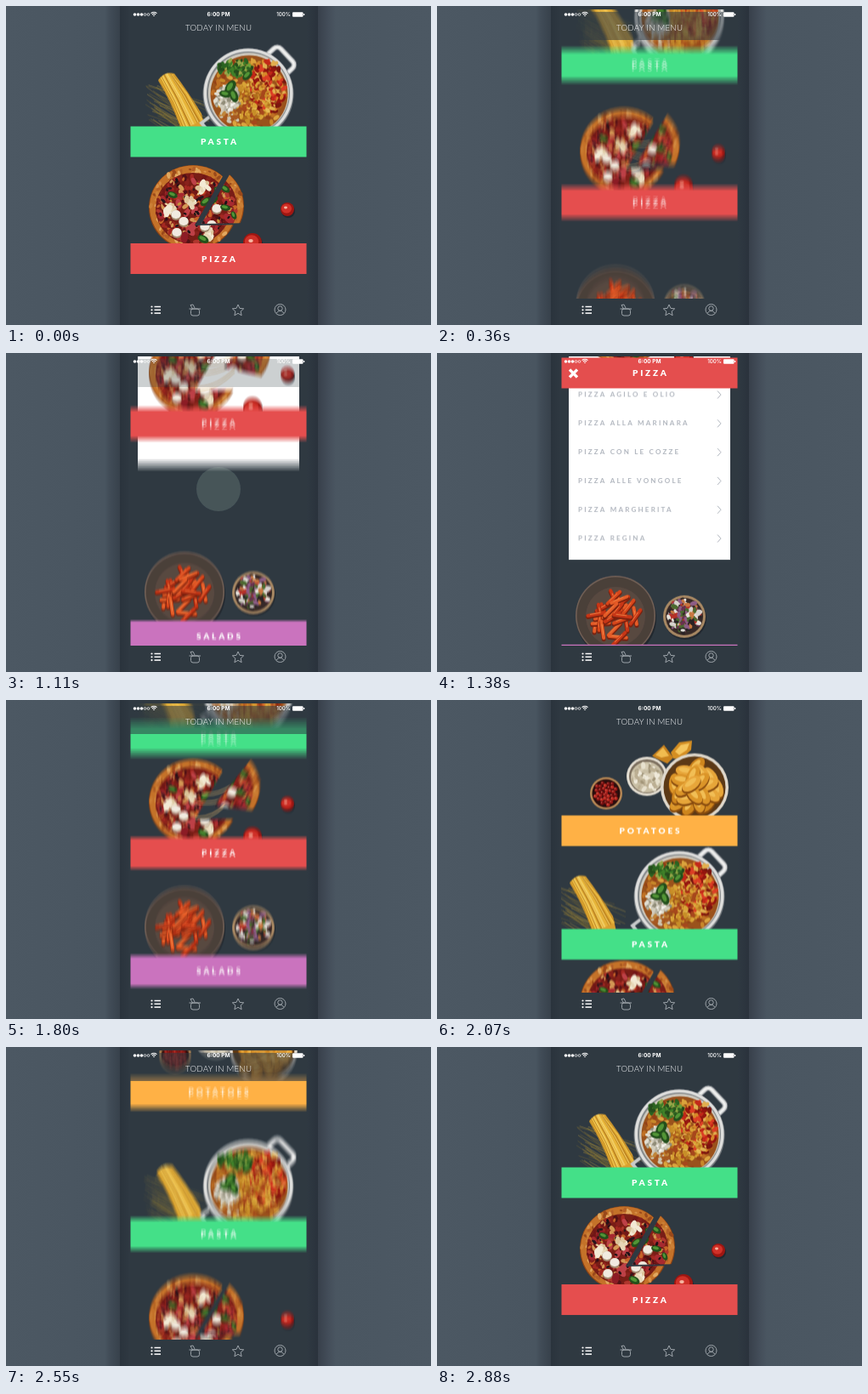
Animation, 500 px wide and 375 px high, one loop 2910 ms. Source, as an HTML page with a canvas:

```html
<!DOCTYPE html>
<html lang="en">
<head>
<meta charset="utf-8">
<title>Today in menu</title>
<style>
html, body { margin: 0; width: 100%; height: 100%; overflow: hidden; background: #4b5762; }
canvas { display: block; width: 500px; height: 375px; }
</style>
</head>
<body>
<canvas id="stage" width="500" height="375"></canvas>
<script>
const LOOP = 2910, STEP = 30, SHUTTER = 11, SAMPLES = 8;
const W = 500, H = 375, LEFT = 146, RISE = 130, BAR = 36;
const DARK = '#323c45', FONT = 'Lato, sans-serif';
const ctx = document.getElementById('stage').getContext('2d');

function layer(w, h) {
  const c = document.createElement('canvas');
  c.width = w; c.height = h;
  return c.getContext('2d');
}

// ---- easing ----
const clamp = v => Math.max(0, Math.min(1, v));
const ramp = (t, a, b) => clamp((t - a) / (b - a));

// cubic-bezier(.5, 0, .2, 1)
function ease(u) {
  if (u <= 0) return 0;
  if (u >= 1) return 1;
  let lo = 0, hi = 1, s = 0.5;
  for (let i = 0; i < 18; i++) {
    s = (lo + hi) / 2;
    const r = 1 - s;
    if (1.5 * r * r * s + 0.6 * r * s * s + s * s * s < u) lo = s; else hi = s;
  }
  return s * s * (3 - 2 * s);
}
const glide = (t, start, dur) => ease((t - start) / dur);

// ---- drawing helpers ----
let seed = 1;
function rnd() {
  seed = (seed * 1664525 + 1013904223) >>> 0;
  return seed / 4294967296;
}
const pick = list => list[Math.floor(rnd() * list.length)];

function blob(g, x, y, rx, ry, fill, rot = 0) {
  g.fillStyle = fill;
  g.beginPath();
  g.ellipse(x, y, rx, ry, rot, 0, 7);
  g.fill();
}
function line(g, pts, color, width) {
  g.strokeStyle = color;
  g.lineWidth = width;
  g.beginPath();
  pts.forEach(([x, y], i) => i ? g.lineTo(x, y) : g.moveTo(x, y));
  g.stroke();
}
function poly(g, pts, fill) {
  g.fillStyle = fill;
  g.beginPath();
  pts.forEach(([x, y]) => g.lineTo(x, y));
  g.closePath();
  g.fill();
}
function scatter(g, n, x, y, rx, ry, size, colors) {
  for (let i = 0; i < n; i++) {
    const a = rnd() * 6.28, d = Math.sqrt(rnd()), s = size * (0.5 + rnd() * 0.6);
    blob(g, x + Math.cos(a) * d * rx, y + Math.sin(a) * d * ry, s, s * 0.6, pick(colors), rnd() * 3);
  }
}
function leaf(g, x, y, size, rot) {
  blob(g, x, y, size, size * 0.6, '#27521f', rot);
  blob(g, x - 0.6, y - 0.8, size * 0.6, size * 0.3, '#55963a', rot);
}
function tomato(g, x, y, r) {
  blob(g, x + 1, y + 2, r, r, '#232a32');
  blob(g, x, y, r, r, '#a01a15');
  blob(g, x - 1, y - 1, r * 0.75, r * 0.7, '#d0342a');
  blob(g, x - 2, y - 2, r * 0.25, r * 0.18, '#f7b8a4');
}
function text(g, str, x, y, font, color, spacing, align = 'center') {
  g.font = font + ' ' + FONT;
  g.fillStyle = color;
  g.letterSpacing = spacing + 'px';
  g.textAlign = align;
  g.textBaseline = 'middle';
  g.fillText(str, align === 'center' ? x + spacing / 2 : x, y);
}

// ---- food; x on stage, y relative to the bar top ----
function sprite(draw) {
  seed = 77;
  const g = layer(210, RISE + 32);
  g.translate(-LEFT, RISE);
  draw(g);
  return g.canvas;
}
const put = (g, img, x, y) => g.drawImage(img, LEFT + x, y - RISE);

const potatoes = sprite(g => {
  blob(g, 199, -26, 19, 19, '#b98a58');
  blob(g, 199, -26, 16.5, 16.5, '#2e1110');
  for (let i = 0; i < 34; i++) {
    const d = 14 * Math.sqrt(i / 34), x = 199 + Math.cos(i * 2.4) * d, y = -26 + Math.sin(i * 2.4) * d;
    blob(g, x, y, 2.3, 2.2, pick(['#9a1c1a', '#bb2a22', '#7c1414']));
    blob(g, x - 0.6, y - 0.7, 0.7, 0.6, '#e08070');
  }
  blob(g, 247, -46, 24, 23, '#e4ded2');
  blob(g, 247, -46, 21, 20, '#7d7160');
  blob(g, 247, -45, 19, 18, '#c9bfa6');
  scatter(g, 60, 247, -45, 16, 15, 4, ['#e8e1cf', '#bcb094', '#a4987c', '#efe9da', '#d8ceb6']);
  poly(g, [[253, -70], [267, -83], [278, -68], [271, -61], [258, -67]], '#c98422');
  poly(g, [[257, -71], [266, -80], [273, -70], [264, -68]], '#f2bc52');
  poly(g, [[275, -74], [285, -86], [300, -88], [299, -77], [287, -66], [278, -67]], '#d48f26');
  poly(g, [[280, -75], [287, -83], [297, -85], [294, -77], [285, -71]], '#f6c660');
  blob(g, 303, -33, 40, 40, '#e0d9cc');
  blob(g, 303, -33, 36.5, 36.5, '#5e3c1a');
  for (let i = 0; i < 21; i++) {
    const a = i * 2.4, d = 26 * Math.sqrt(1 - i / 21), rot = rnd() * 3;
    const x = 303 + Math.cos(a) * d, y = -33 + Math.sin(a) * d;
    blob(g, x, y + 2, 13, 7.5, '#8a4e12', rot);
    blob(g, x, y, 12.5, 7, pick(['#dc962c', '#cf8622', '#e8a73e']), rot);
    blob(g, x - 1, y - 1.5, 8, 3, '#f2bf58', rot);
  }
});

const strands = sprite(g => {
  g.lineCap = 'round';
  for (let i = 0; i < 34; i++) {
    const y = -50 + rnd() * 44, x = 164 + rnd() * 18;
    line(g, [[x, y], [x + 44 + rnd() * 24, y + 16 + rnd() * 28]], pick(['#857238', '#a08a40', '#6b6036']), 0.6);
  }
  g.beginPath();
  g.moveTo(179, -54);
  g.quadraticCurveTo(186, -65, 198, -62);
  g.quadraticCurveTo(212, -44, 230, -15);
  g.lineTo(234, 3);
  g.lineTo(206, 3);
  g.quadraticCurveTo(194, -30, 179, -54);
  g.fillStyle = '#d9a032';
  g.fill();
  for (let i = 0; i < 26; i++) {
    const k = i / 25;
    line(g, [[180 + 17 * k, -55 - 7 * Math.sin(k * 2.4)], [195 + 19 * k, -27 - 12 * k], [207 + 25 * k, 4 - 12 * k]],
      pick(['#f8d460', '#eebe42', '#b98222', '#fbe07c']), 0.9);
  }
});

const pot = sprite(g => {
  line(g, [[243, -14], [230, -4], [240, 8]], '#c9cbcb', 4);
  g.save();
  g.translate(323, -77);
  g.rotate(0.82);
  for (const [color, width] of [['#6f7479', 7], ['#d4d6d7', 5], ['#f3f3f2', 2]]) {
    g.strokeStyle = color;
    g.lineWidth = width;
    g.beginPath();
    g.roundRect(-16, -10, 32, 24, 6);
    g.stroke();
  }
  g.restore();
  blob(g, 285, -38, 53.5, 53.5, '#787d80');
  blob(g, 285, -39, 52.5, 52.5, '#dededd');
  blob(g, 285, -39, 49, 49, '#84888a');
  blob(g, 285.5, -39, 47.5, 47.5, '#cfcabf');
  blob(g, 286, -38, 45.5, 45.5, '#9c5420');
  scatter(g, 170, 286, -38, 43, 43, 4, ['#c98a2e', '#b5611f', '#dba640', '#93401a', '#c07428']);
  scatter(g, 190, 308, -46, 20, 32, 4, ['#c22a1c', '#961812', '#dc4028', '#d88a2e', '#7c1a12', '#e2b052']);
  scatter(g, 130, 290, -28, 20, 24, 3.5, ['#d9a53a', '#e6bd58', '#b0701f', '#c8902c', '#a84a20']);
  scatter(g, 70, 270, -69, 20, 10, 4, ['#41802c', '#6fa03c', '#2f6524', '#98a84c', '#284f20']);
  scatter(g, 150, 260, -32, 15, 16, 3.5, ['#e2ded2', '#b9b5a4', '#f6f4ee', '#938f7c', '#d2cdbd']);
  scatter(g, 30, 263, -12, 12, 7, 3.5, ['#cfc8b5', '#c0863c', '#a85c24']);
  leaf(g, 264, -46, 9, -1); leaf(g, 258, -38, 7, 0.2);
  leaf(g, 268, -36, 8, 1.2); leaf(g, 284, -60, 7, -0.8);
});

const pizza = sprite(g => {
  blob(g, 220, -42, 52, 50, '#8f4719');
  blob(g, 220, -42.5, 51, 49, '#c5752e');
  scatter(g, 190, 220, -42, 50, 48, 3.5, ['#d9924a', '#b5622a', '#e2a962', '#9c4c1e', '#cc8038']);
  blob(g, 220, -41, 44, 42, '#7c2219');
  scatter(g, 260, 220, -41, 42, 40, 4, ['#74191a', '#a62c24', '#c8662c', '#541518', '#d49a58', '#b03a30', '#8a2420']);
  scatter(g, 22, 220, -41, 38, 36, 7, ['#a82e34', '#8c2028', '#be4448']);
  scatter(g, 60, 220, -41, 40, 38, 2.5, ['#22151a', '#ecd0a0', '#2e1a20', '#c6923e']);
  for (const [x, y] of [[194, -39], [233, -66], [218, -50], [239, -11]]) {
    scatter(g, 9, x, y, 6, 6, 6, ['#e8d8b8', '#f4ebd6', '#dcc49a']);
  }
  for (const [x, y] of [[201, -13], [209, -26], [234, -20], [200, -34], [240, -39]]) {
    blob(g, x, y + 1, 6, 6, '#a38c74');
    blob(g, x, y, 5.5, 5, '#f2ebe0');
  }
  leaf(g, 235, -49, 7, -0.6); leaf(g, 250, -62, 6, 0.6); leaf(g, 196, -57, 6, 0.4);
  leaf(g, 232, -5, 7, 0.5); leaf(g, 250, -40, 6, 0.2); leaf(g, 260, -31, 5, 1.2);
});

function wedge(g) {
  g.moveTo(222, -21);
  g.lineTo(258, -84);
  g.lineTo(290, -70);
  g.lineTo(284, -22);
  g.closePath();
}
const base = sprite(g => {
  g.beginPath();
  g.rect(LEFT, -RISE, 210, 170);
  wedge(g);
  g.clip('evenodd');
  put(g, pizza, 0, 0);
});
const slice = sprite(g => {
  g.beginPath();
  wedge(g);
  g.clip();
  put(g, pizza, 0, 0);
});
const cherries = sprite(g => { tomato(g, 331, -40, 8); tomato(g, 290, -1, 11); });

const salads = sprite(g => {
  blob(g, 211, -31, 47, 47, '#262b31');
  blob(g, 210, -34, 47, 47, '#77655a');
  blob(g, 210, -34, 45.5, 45.5, '#4d423e');
  blob(g, 210, -33, 35, 35, '#5c4c44');
  g.lineCap = 'round';
  for (let i = 0; i < 32; i++) {
    const a = rnd() * 6.28, d = 25 * Math.sqrt(rnd()), rot = -0.9 + (rnd() - 0.5) * 2.2;
    const x = 210 + Math.cos(a) * d, y = -31 + Math.sin(a) * d;
    const dx = Math.cos(rot) * 10, dy = Math.sin(rot) * 10;
    line(g, [[x - dx, y - dy + 1.5], [x + dx, y + dy + 1.5]], '#7c2412', 5);
    line(g, [[x - dx, y - dy], [x + dx, y + dy]], pick(['#d9491f', '#e65f2a', '#c93a1a']), 4);
    line(g, [[x - dx * 0.7, y - dy * 0.7 - 1], [x + dx * 0.5, y + dy * 0.5 - 1]], '#f08448', 1);
  }
  blob(g, 292, -31, 25, 25, '#262b31');
  blob(g, 291, -33, 25, 25, '#a98a66');
  blob(g, 291, -33, 22, 22, '#3b2d2a');
  scatter(g, 130, 291, -33, 19, 19, 4, ['#d8d3cf', '#b8342a', '#4d6e33', '#6a3552', '#e8e4dd', '#2c2528', '#c97a44', '#8e5f86']);
});

// ---- cards ----
const cards = [
  { name: 'POTATOES', color: '#ffb347', open: -137 },
  { name: 'PASTA', color: '#46e08a', open: -137 },
  { name: 'PIZZA', color: '#e55150', open: -137 },
  { name: 'SALADS', color: '#cb76bf', open: 64 }
];
const START = [-36, 141.5, 279, 440], NEXT = [-173, -30, 142, 279], TOP = [142, 279, 416, 577];
const moves = [
  { at: 150, from: START, to: NEXT, lag: [0, 0, 8, 37] },
  { at: 1635, from: NEXT, to: TOP, lag: [0, 22, 64, 64] },
  { at: 2325, from: TOP, to: START, lag: [0, 8, 37, 37] }
];
const dishes = ['AGILO E OLIO', 'ALLA MARINARA', 'CON LE COZZE', 'ALLE VONGOLE', 'MARGHERITA', 'REGINA'];

function cardY(i, t, open) {
  let y = START[i];
  for (const m of moves) y += (m.to[i] - m.from[i]) * glide(t, m.at + m.lag[i], 530);
  return y + cards[i].open * open;
}

function drawPizza(g, y, t) {
  const pull = glide(t, 260, 370) - glide(t, 1660, 400);
  const dx = 8 + 31 * pull, dy = -2 - 19 * pull;
  put(g, base, 0, y);
  if (pull > 0.05) {
    g.lineWidth = 1.5;
    g.strokeStyle = '#d9ad69';
    for (const [x1, y1, x2, y2] of [[230, -52, 236, -46], [220, -42, 226, -30], [222, -24, 230, -24]]) {
      g.beginPath();
      g.moveTo(x1, y + y1);
      g.quadraticCurveTo((x1 + x2 + dx) / 2, y + y1 + 3, x2 + dx, y + y2 + dy);
      g.stroke();
    }
  }
  g.save();
  g.translate(247 + dx, y - 45 + dy);
  g.rotate(0.25 * pull);
  put(g, slice, -247, 45);
  g.restore();
  put(g, cherries, 0, y);
}

function drawFood(g, i, y, t) {
  if (i === 0) put(g, potatoes, 0, y);
  if (i === 1) {
    const away = glide(t, 1650, 400) - glide(t, 2325, 350);
    put(g, strands, -23 * away, y);
    put(g, pot, 0, y);
  }
  if (i === 2) drawPizza(g, y, t);
  if (i === 3) put(g, salads, 0, y);
}

function drawList(g, open) {
  const bottom = -11 + 255 * open;
  g.fillStyle = '#fff';
  g.fillRect(155, bottom - 260, 190, 260);
  g.globalAlpha = ramp(open, 0.6, 0.95);
  dishes.forEach((dish, i) => {
    const y = bottom - 25 - 33.8 * (5 - i);
    text(g, 'PIZZA ' + dish, 166, y, '700 8px', '#b3b8c0', 2.2, 'left');
    line(g, [[330, y - 4.5], [334, y], [330, y + 4.5]], '#b3b8c0', 1);
  });
  g.globalAlpha = 1;
}

function drawScene(g, t) {
  const open = glide(t, 893, 530) - glide(t, 1420, 300);
  g.fillStyle = DARK;
  g.fillRect(LEFT, 0, 208, H);
  g.save();
  g.beginPath();
  g.rect(LEFT, 4, 208, 340);
  g.clip();
  if (open > 0) drawList(g, open);
  const ys = cards.map((c, i) => cardY(i, t, open));
  ys.forEach((y, i) => {
    if (y < -BAR - 30 || y > 480) return;
    drawFood(g, i, y, t);
    g.fillStyle = cards[i].color;
    g.fillRect(146.5, y, 207, BAR);
    text(g, cards[i].name, 250, y + 18.5, '900 10px', '#fff', 2.8);
  });
  // header veil
  g.globalAlpha = 0.55 * (1 - open);
  g.fillStyle = DARK;
  g.fillRect(LEFT, 7, 208, 33);
  g.globalAlpha = ramp(open, 0.65, 0.95);
  const x = 160.5, y = ys[2] + 18.5;
  line(g, [[x - 4.5, y - 4.5], [x + 4.5, y + 4.5]], '#fff', 3.4);
  line(g, [[x + 4.5, y - 4.5], [x - 4.5, y + 4.5]], '#fff', 3.4);
  g.globalAlpha = clamp(1 - 2 * open);
  text(g, 'TODAY IN MENU', 250, 26.3, '300 9.7px', '#fff', 0.2);
  g.restore();

  const tap = 0.5 * (ramp(t, 760, 860) - ramp(t, 900, 1250));
  if (tap > 0) {
    g.globalAlpha = tap;
    blob(g, 250, 160, 26, 26, '#aac8b4');
    g.globalAlpha = 1;
  }
}

// ---- fixed parts ----
function drawPhone(g) {
  const grad = g.createLinearGradient(0, 0, W, 0);
  const stops = [[0, '#4c5863'], [116, '#495560'], [122, '#414c57'], [134, '#37414b'], [134, '#2a333c'],
    [146, '#2f3942'], [354, '#2f3942'], [367, '#2a323c'], [367, '#38404b'], [380, '#444e5a'], [388, '#4a5661'], [500, '#4c5863']];
  for (const [x, c] of stops) grad.addColorStop(x / W, c);
  g.fillStyle = grad;
  g.fillRect(0, 0, W, H);
}

function drawChrome(g) {
  g.lineWidth = 0.7;
  g.strokeStyle = '#fff';
  for (let i = 0; i < 5; i++) {
    if (i < 3) blob(g, 151.5 + i * 4, 10, 1.8, 1.8, '#fff');
    else {
      g.beginPath();
      g.arc(151.5 + i * 4, 10, 1.4, 0, 7);
      g.stroke();
    }
  }
  g.lineWidth = 1.1;
  for (const r of [1.2, 3.2, 5.2]) {
    g.beginPath();
    g.arc(174, 12.5, r, -2.3, -0.84);
    g.stroke();
  }
  g.textBaseline = 'middle';
  g.fillStyle = '#fff';
  g.letterSpacing = '0px';
  g.textAlign = 'center';
  g.font = '700 6.5px Inter, sans-serif';
  g.fillText('6:00 PM', 250, 10);
  g.font = '500 6.2px Inter, sans-serif';
  g.fillText('100%', 326.5, 10);
  g.beginPath();
  g.roundRect(337, 7.3, 12.5, 5.4, 1);
  g.fill();
  g.fillRect(350, 9, 1.2, 2);

  // tab icons
  for (let i = 0; i < 3; i++) {
    const y = 353.5 + i * 3.8;
    blob(g, 171.5, y, 1.1, 1.1, '#fff');
    line(g, [[174.5, y], [182, y]], '#fff', 1.5);
  }
  const soft = '#a9afb5';
  g.strokeStyle = soft;
  g.lineWidth = 0.9;
  g.beginPath();
  g.roundRect(217.5, 356, 10, 8, 2.5);
  g.stroke();
  line(g, [[215.5, 356], [229, 356]], soft, 0.9);
  line(g, [[219.5, 356], [217, 351.5], [220, 351], [222, 355]], soft, 0.9);

  g.beginPath();
  for (let i = 0; i < 10; i++) {
    const a = -Math.PI / 2 + i * Math.PI / 5, r = i % 2 ? 3.3 : 7;
    g.lineTo(273 + Math.cos(a) * r, 358 + Math.sin(a) * r);
  }
  g.closePath();
  g.stroke();

  g.beginPath();
  g.arc(322.5, 357, 6.5, 0, 7);
  g.stroke();
  g.beginPath();
  g.arc(322.5, 355.5, 2.7, 0, 7);
  g.stroke();
  g.beginPath();
  g.arc(322.5, 363, 4.6, -2.7, -0.44);
  g.stroke();
}

const phone = layer(W, H), chrome = layer(W, H), scene = layer(W, H);
drawPhone(phone);
drawChrome(chrome);

function render(t) {
  ctx.drawImage(phone.canvas, 0, 0);
  // average a short exposure for motion blur
  for (let k = 0; k < SAMPLES; k++) {
    drawScene(scene, t + SHUTTER * (k / (SAMPLES - 1) - 0.5));
    ctx.globalAlpha = 1 / (k + 1);
    ctx.drawImage(scene.canvas, LEFT, 0, 208, H, LEFT, 0, 208, H);
  }
  ctx.globalAlpha = 1;
  ctx.drawImage(chrome.canvas, 0, 0);
}

const begin = performance.now();
let last = -1;
function tick() {
  const t = Math.floor(((performance.now() - begin) % LOOP) / STEP) * STEP;
  if (t !== last) render(last = t);
  requestAnimationFrame(tick);
}
tick();
</script>
</body>
</html>
```
